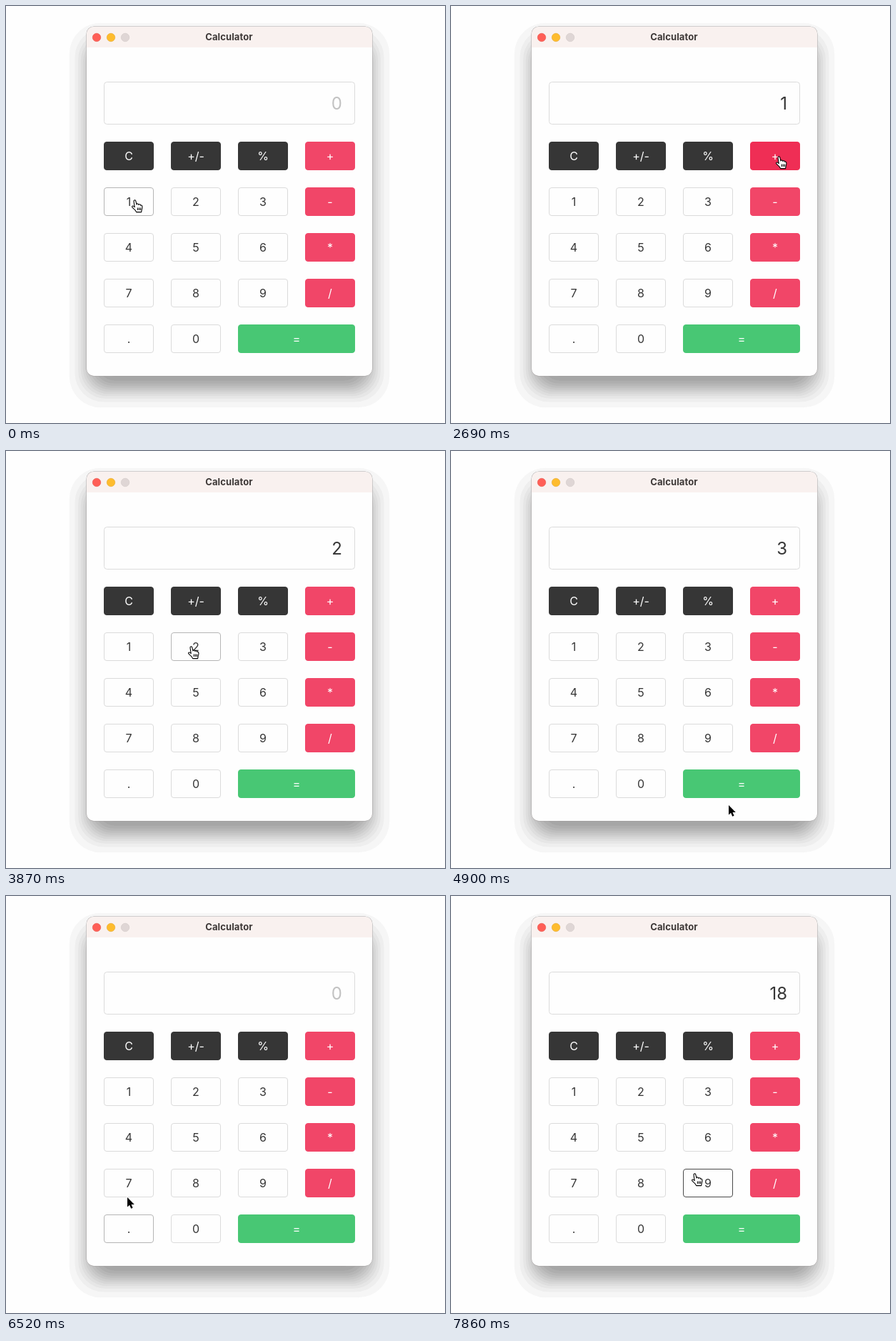
Animation, 615 px wide and 584 px high, one loop 8 s. Source, as an HTML page:

```html
<!DOCTYPE html>
<html lang="en">
<head>
<meta charset="utf-8">
<title>Calculator</title>
<style>
  html, body { margin: 0; width: 100%; height: 100%; overflow: hidden; background: #fefefe; }
  svg { display: block; width: 615px; height: 584px; }
  text { font: 16px Inter, "Open Sans", sans-serif; text-anchor: middle; fill: #363636; }
  .title { font-weight: 700; font-size: 13px; letter-spacing: .12px; fill: #3e3938; }
  #display { font-size: 24px; text-anchor: end; }
  #display.empty { fill: #c2c2c2; }
  .plain rect { fill: #fefefe; stroke: #dbdbdb; }
  .plain.hover rect { stroke: #b5b5b5; }
  .plain.active rect { stroke: #4a4a4a; }
  .dark rect { fill: #363636; stroke: #363636; }
  .dark.hover rect { fill: #2f2f2f; stroke: #2f2f2f; }
  .dark.active rect { fill: #292929; stroke: #292929; }
  .red rect { fill: #f14668; stroke: #f14668; }
  .red.active rect { fill: #ef2e55; stroke: #ef2e55; }
  .green rect { fill: #48c774; stroke: #48c774; }
  .dark text, .red text, .green text { fill: #fff; }
  #hand path { fill: #fff; stroke: #000; stroke-width: 1.1; stroke-linejoin: round; }
  #arrow path { fill: #000; stroke: #fff; stroke-width: 1.6; paint-order: stroke; }
</style>
</head>
<body>
<svg viewBox="0 0 615 584">
  <g id="shadow"></g>
  <rect x="112.5" y="28.5" width="401" height="490" rx="10.5" fill="#a9a5a5"/>
  <rect x="113" y="29" width="400" height="489" rx="10" fill="#fefefe"/>
  <path d="M113 58V39a10 10 0 0 1 10-10H503a10 10 0 0 1 10 10V58Z" fill="#f9f1ef"/>
  <circle cx="127" cy="44" r="5.75" fill="#ff5f57" stroke="#e2483f" stroke-width=".5"/>
  <circle cx="147" cy="44" r="5.75" fill="#febc2e" stroke="#dfa023" stroke-width=".5"/>
  <circle cx="167" cy="44" r="5.75" fill="#dfd6d5" stroke="#cbc2c1" stroke-width=".5"/>
  <text class="title" x="312.5" y="48">Calculator</text>
  <rect x="137.5" y="106.5" width="351" height="59" rx="4" fill="#fefefe" stroke="#dbdbdb"/>
  <text id="display" x="471" y="145"></text>
  <g id="keys"></g>
  <g id="hand">
    <path d="M4.2 10.6L3.2 4Q2.6 1 4.2.8 5.6.6 6 2.8L7 7Q7.3 5.6 8.6 6 9.6 6.2 9.8 7.4 10.4 6.4 11.6 6.8 12.6 7.2 12.6 8.2 13.8 7.6 14.6 8.8 15.4 11 14.4 13.4L13.6 17.6H6.6Q5.8 15.4 3.4 13.4L.8 10.8Q.2 9.4 1.4 9 2.6 8.8 4.2 10.6Z"/>
    <path d="M8.4 11.5V15M10.5 11.5V15M12.5 11.5V15"/>
  </g>
  <g id="arrow"><path d="M0 0V13.6L3.1 10.8 5.2 15.8 7.6 14.8 5.5 9.9H9.8Z"/></g>
</svg>
<script>
const LOOP = 8000, START = 1492, STEP = 147.8;
const $ = id => document.getElementById(id);

// Window shadow in flat bands of grey
let bands = "";
for (let grey = 246; grey > 154; grey -= 8) {
  const p = (251 - grey + 4) / 255 / 0.42 - 0.019;
  const d = Math.min(29, 9.1 * Math.log((1 - p) / p));
  bands += `<rect x="${113 - d}" y="${48 - d}" width="${400 + 2 * d}" height="${490 + 2 * d}"
    rx="${33 + d * 0.45}" fill="rgb(${grey},${grey},${grey})"/>`;
}
$("shadow").innerHTML = bands;

const rows = [["C", "+/-", "%", "+"], ["1", "2", "3", "-"], ["4", "5", "6", "*"], ["7", "8", "9", "/"], [".", "0", "="]];
const keys = rows.flatMap((row, r) => row.map((label, c) => ({
  label, x: 137 + 94 * c, y: 190 + 64 * r, w: label === "=" ? 164 : 70, h: 40,
  kind: label === "=" ? "green" : c === 3 ? "red" : r === 0 ? "dark" : "plain"
})));
$("keys").innerHTML = keys.map(k => `<g class="${k.kind}">
  <rect x="${k.x + .5}" y="${k.y + .5}" width="${k.w - 1}" height="${k.h - 1}" rx="3.5"/>
  <text x="${k.x + k.w / 2}" y="${k.y + 26}">${k.label}</text></g>`).join("");
keys.forEach((k, i) => k.node = $("keys").children[i]);

// Pointer stops: [step, x, y]
const path = [
  [-1, 181, 272], [2, 181, 272], [3, 205, 305], [5, 320, 379], [7, 458, 225], [8, 460, 211], [9, 460, 211],
  [12, 370, 390], [15, 262, 280], [16, 260, 274],
  [17, 278, 318], [19, 385, 465], [21, 385, 465], [23, 389, 496], [24, 380, 531],
  [28, 177, 214], [29, 177, 212], [30, 175, 244], [33, 170, 487], [36, 170, 292], [37, 170, 285], [38, 170, 285],
  [41, 262, 392], [42, 275, 392], [43, 342, 389]
];
const presses = { 0: "1", 8: "+", 15: "2", 28: "C", 38: "1", 41: "8", 43: "9" };
const readings = [[-1, "0"], [1, "1"], [9, "0"], [16, "2"], [21, "3"], [29, "0"], [39, "1"], [42, "18"]];

function pointerAt(step) {
  const i = path.findIndex(p => p[0] >= step);
  if (i < 1) return path[i < 0 ? path.length - 1 : 0].slice(1);
  const [s0, x0, y0] = path[i - 1], [s1, x1, y1] = path[i];
  const f = (step - s0) / (s1 - s0);
  return [x0 + (x1 - x0) * f, y0 + (y1 - y0) * f];
}

const keyUnder = ([x, y]) => keys.find(k => x >= k.x && x < k.x + k.w && y >= k.y && y < k.y + k.h);

let shown;
function draw(step) {
  const [x, y] = pointerAt(step).map(Math.round);
  const overKey = keyUnder([x, y]);
  const hovered = keyUnder(pointerAt(step - 0.5)); // highlight trails the pointer
  for (const k of keys) {
    const state = presses[step] === k.label ? " active" : k === hovered ? " hover" : "";
    k.node.setAttribute("class", k.kind + state);
  }
  const value = readings.filter(r => r[0] <= step).pop()[1];
  $("display").textContent = value;
  $("display").setAttribute("class", value === "0" ? "empty" : "");
  $("hand").setAttribute("transform", `translate(${x - 5} ${y - 1})`);
  $("arrow").setAttribute("transform", `translate(${x} ${y})`);
  $("hand").style.display = overKey ? "" : "none";
  $("arrow").style.display = overKey ? "none" : "";
}

function tick() {
  const step = Math.max(-1, Math.floor((performance.now() % LOOP - START) / STEP));
  if (step !== shown) draw(shown = step);
  requestAnimationFrame(tick);
}
tick();
</script>
</body>
</html>
```
